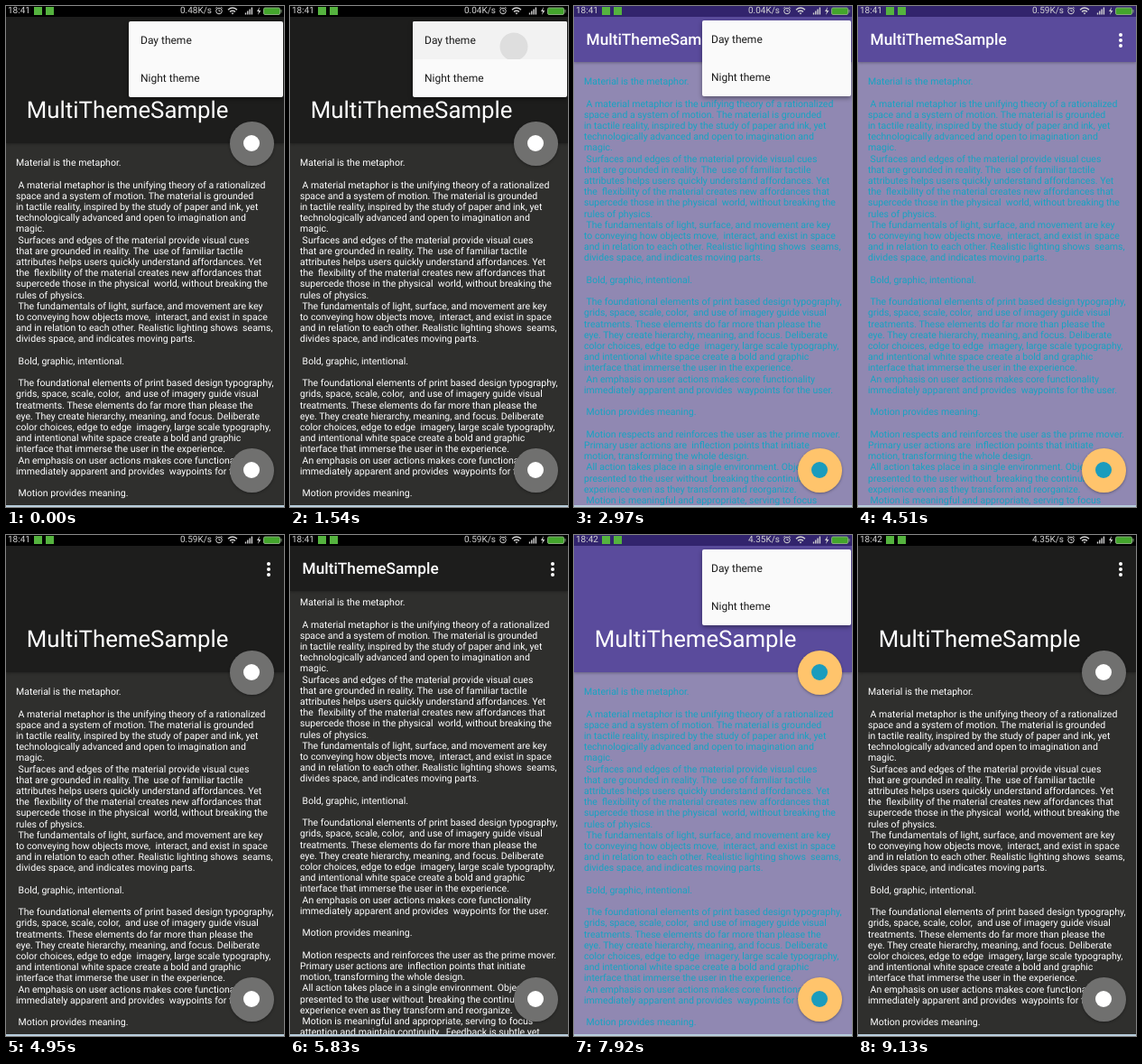
Write an HTML page that moves like this. It is 308x555 px and loops after 9.24 s.

```html
<!DOCTYPE html>
<html lang="en">
<head>
<meta charset="utf-8">
<title>Theme switching</title>
<style>
html, body { margin: 0; width: 100%; height: 100%; overflow: hidden; background: #000; }
#stage {
  position: relative; width: 308px; height: 555px; overflow: hidden;
  font-family: Roboto, sans-serif; text-rendering: geometricPrecision;
}
#stage div { position: absolute; box-sizing: border-box; }
.screen { inset: 0; overflow: hidden; background: var(--body); }
.night {
  --bar: #000; --head: #1d1d1c; --body: #2f2f2d; --text: #fff; --fab: #70706f; --icon: #fff;
  --menu-x: 136px; --menu-y: 17px; --menu-w: 171px; --pad: 13px;
}
.day {
  --bar: #32246d; --head: #5a4b9c; --body: #9088b2; --text: #17a3c2; --fab: #ffc46c; --icon: #1b9cbd;
  --menu-x: 142px; --menu-y: 16px; --menu-w: 165px; --pad: 10px;
}
.text {
  left: 11px; top: 168.2px; white-space: pre; color: var(--text);
  font-size: 10.55px; line-height: 12.2px;
}
.head { left: 0; top: 0; width: 308px; background: var(--head); box-shadow: 0 1px 3px rgba(0, 0, 0, .3); }
.bar { left: 0; top: 0; width: 308px; height: 12px; background: var(--bar); }
.title { color: #fff; line-height: 30px; white-space: pre; }
.dot { left: 289px; width: 4px; height: 4px; border-radius: 50%; background: #fff; }
.fab {
  left: 247.5px; width: 49px; height: 49px; border-radius: 50%;
  background: var(--fab); box-shadow: 0 1px 3px rgba(0, 0, 0, .35);
}
.fab::after {
  content: ""; position: absolute; inset: 15.5px; border-radius: 50%; background: var(--icon);
}
.menu {
  left: var(--menu-x); top: var(--menu-y); width: var(--menu-w); height: 84px; overflow: hidden;
  border-radius: 2px; background: #fafafa; transform-origin: 100% 0; box-shadow: 0 2px 5px rgba(0, 0, 0, .4);
}
.item {
  left: 0; width: 100%; height: 42px; padding-left: var(--pad); overflow: hidden;
  font-size: 12px; line-height: 42px; color: #1b1b1b;
}
.item span { position: relative; }
.ripple {
  left: calc(248px - var(--menu-x)); top: 28px; border-radius: 50%;
  background: #dedede; transform: translate(-50%, -50%);
}
#edge { left: 0; top: 553px; width: 308px; height: 2px; background: #b9cfde; }
#status { inset: 0 0 auto 0; height: 12px; color: #d4d4d4; font-size: 10px; line-height: 11px; }
#clock { left: 2px; top: 0; }
#speed { right: 80px; top: 0; }
#status svg { position: absolute; left: 0; top: 0; }
</style>
</head>
<body>
<div id="stage">
  <div class="screen night"></div>
  <div class="screen day"></div>
  <div id="edge"></div>
  <div id="status">
    <div id="clock"></div>
    <div id="speed"></div>
    <svg width="308" height="12" fill="none" stroke="#d4d4d4">
      <g fill="#55b33f" stroke="none">
        <rect x="31" y="1" width="9" height="9"/>
        <rect x="44" y="1" width="9" height="9"/>
      </g>
      <circle cx="236" cy="5.5" r="3.3"/>
      <path d="M236 3.5v2.2h1.6M232.2 2.6l1.6-1.6M239.8 2.6l-1.6-1.6" stroke-width=".9"/>
      <path d="M246 4.2q5-4.2 10 0M248 6.4q3-2.4 6 0" stroke-width="1.4"/>
      <path d="M249.5 7.6h3L251 9.6z" fill="#d4d4d4" stroke="none"/>
      <path d="M265.5 9.5v-2M267.8 9.5v-4M270.1 9.5v-6M272.4 9.5v-8" stroke-width="1.4"/>
      <path d="M281 1l-3 5h2l-1 4 3.4-5h-2.2z" fill="#d4d4d4" stroke="none"/>
      <rect x="285.5" y="2" width="18" height="7.5" rx="1.5" fill="#43a52c" stroke="#86a97c"/>
      <path d="M305 4v3.5" stroke="#86a97c"/>
    </svg>
  </div>
</div>
<script>
const LOOP = 9240, STEP = 110;

const TEXT = `Material is the metaphor.

 A material metaphor is the unifying theory of a rationalized
space and a system of motion. The material is grounded
in tactile reality, inspired by the study of paper and ink, yet
technologically advanced and open to imagination and
magic.
 Surfaces and edges of the material provide visual cues
that are grounded in reality. The  use of familiar tactile
attributes helps users quickly understand affordances. Yet
the  flexibility of the material creates new affordances that
supercede those in the physical  world, without breaking the
rules of physics.
 The fundamentals of light, surface, and movement are key
to conveying how objects move,  interact, and exist in space
and in relation to each other. Realistic lighting shows  seams,
divides space, and indicates moving parts.

 Bold, graphic, intentional.

 The foundational elements of print based design typography,
grids, space, scale, color,  and use of imagery guide visual
treatments. These elements do far more than please the
eye. They create hierarchy, meaning, and focus. Deliberate
color choices, edge to edge  imagery, large scale typography,
and intentional white space create a bold and graphic
interface that immerse the user in the experience.
 An emphasis on user actions makes core functionality
immediately apparent and provides  waypoints for the user.

 Motion provides meaning.

 Motion respects and reinforces the user as the prime mover.
Primary user actions are  inflection points that initiate
motion, transforming the whole design.
 All action takes place in a single environment. Objects are
presented to the user without  breaking the continuity of
experience even as they transform and reorganize.
 Motion is meaningful and appropriate, serving to focus
attention and maintain continuity.  Feedback is subtle yet
clear.  Transitions are efficient yet coherent.`;

// Keys are [time, value] pairs; values before and after are held.
const nightScroll = [[5280, 0], [5830, 99], [6270, 0]];
const dayScroll = [[1980, 0], [2640, 90], [5000, 90], [5001, 0]];
const dayFade = [[1650, 0], [1980, 1], [4620, 1], [4950, 0], [7150, 0], [7480, 1], [8250, 1], [8580, 0]];
const nightMenu = [[1650, 1], [1760, 0], [6270, 0], [6490, 1], [7150, 1], [7260, 0]];
const dayMenu = [[2750, 0], [2970, 1], [4400, 1], [4510, 0], [7700, 0], [7920, 1], [8250, 1], [8360, 0]];

const clamp = v => Math.max(0, Math.min(1, v));
const mix = (a, b, p) => a + (b - a) * p;
const smooth = p => p * p * (3 - 2 * p);
const linear = p => p;

function tween(keys, t, ease = linear) {
  const i = keys.findIndex(k => k[0] > t);
  if (i === 0) return keys[0][1];
  if (i < 0) return keys[keys.length - 1][1];
  const [t0, a] = keys[i - 1], [t1, b] = keys[i];
  return mix(a, b, ease((t - t0) / (t1 - t0)));
}

function createScreen(selector, scroll, menuKeys, picked, taps) {
  const root = document.querySelector(selector);
  const item = (label, i) => `<div class="item" style="top:${i * 42}px">
    ${i === picked ? '<div class="ripple"></div>' : ''}<span>${label}</span></div>`;
  root.innerHTML = `<div class="text">${TEXT}</div><div class="head"></div><div class="bar"></div>
    <div class="title">MultiThemeSample</div>
    ${[30, 36, 42].map(y => `<div class="dot" style="top:${y}px"></div>`).join('')}
    <div class="fab top"></div><div class="fab" style="top:489.5px"></div>
    <div class="menu">${['Day theme', 'Night theme'].map(item).join('')}</div>`;
  const [text, head, title, fab, menu, ripple] =
    ['.text', '.head', '.title', '.top', '.menu', '.ripple'].map(s => root.querySelector(s).style);
  const row = root.querySelector('.ripple').parentNode.style;

  return t => {
    const s = tween(scroll, t, smooth);
    const p = clamp(s / 90);
    const height = 152 - 90 * p;
    text.transform = `translateY(${-s}px)`;
    head.height = height + 'px';
    title.left = mix(22.8, 13.5, p) + 'px';
    title.top = mix(101.2, 23.1, p) + 'px';
    title.fontSize = mix(25.8, 17.3, p) + 'px';
    title.fontWeight = p > .5 ? 500 : 400;
    fab.top = height - 24.5 + 'px';
    fab.transform = `scale(${clamp((height - 85) / 25)})`;

    const open = tween(menuKeys, t);
    menu.opacity = open;
    menu.transform = `scale(${mix(.7, 1, open)})`;

    const tap = taps.find(start => t > start && t <= start + 330);
    const size = tap === undefined ? 0 : 31 * ((t - tap) / STEP) ** 1.5;
    ripple.width = ripple.height = size + 'px';
    row.background = size ? '#f2f2f2' : 'none';
  };
}

const drawNight = createScreen('.night', nightScroll, nightMenu, 0, [1430, 6820]);
const drawDay = createScreen('.day', dayScroll, dayMenu, 1, [4180, 8030]);
const day = document.querySelector('.day').style;
const clock = document.getElementById('clock');
const speed = document.getElementById('speed');

function draw(now) {
  const t = Math.floor(now % LOOP / STEP) * STEP;
  drawNight(t);
  drawDay(t);
  day.opacity = tween(dayFade, t);
  clock.textContent = t < 6380 ? '18:41' : '18:42';
  speed.textContent = (t < 550 ? '0.48' : t < 3960 ? '0.04' : t < 7370 ? '0.59' : '4.35') + 'K/s';
}

const start = performance.now();
function tick() {
  draw(performance.now() - start);
  requestAnimationFrame(tick);
}
tick();
</script>
</body>
</html>
```
